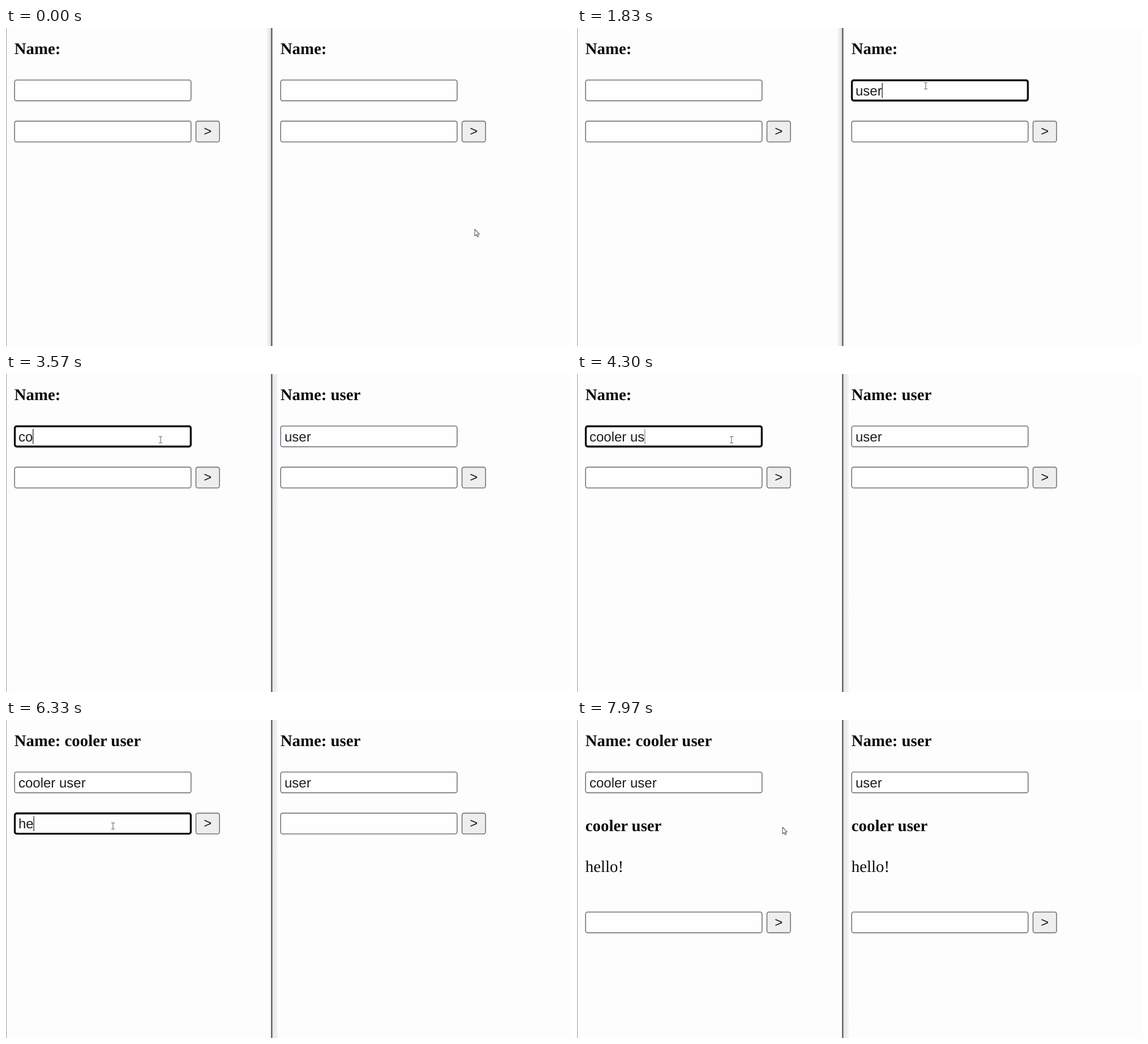
Recreate the animation shown at these times as an HTML page. Size 998x561 px, loop 8 s.

```html
<!DOCTYPE html>
<html lang="en">
<head>
<meta charset="utf-8">
<title>Two chat windows</title>
<style>
  html, body { margin: 0; width: 100%; height: 100%; overflow: hidden; background: #fdfdfd; }
  svg { display: block; width: 100%; height: 100%; }
  text { fill: #0c0c0c; white-space: pre; text-rendering: geometricPrecision; }
  .head { font: bold 28.8px "Liberation Serif", "Times New Roman", serif; }
  .body { font: 28.8px "Liberation Serif", "Times New Roman", serif; }
  .field { font: 24px "Liberation Sans", Arial, sans-serif; fill: #1c1c1c; }
</style>
</head>
<body>
<svg id="stage" viewBox="0 0 998 561">
  <defs>
    <linearGradient id="shadeL">
      <stop offset="0" stop-color="#fdfdfd"/>
      <stop offset="1" stop-color="#dedee2"/>
    </linearGradient>
    <linearGradient id="shadeR">
      <stop offset="0" stop-color="#e6e6e8"/>
      <stop offset="1" stop-color="#f4f4f5"/>
    </linearGradient>
  </defs>
  <rect width="998" height="561" fill="#fdfdfd"/>
  <rect width="1" height="561" fill="#999"/>
  <rect id="leftShade" x="459" width="9" height="561" fill="url(#shadeL)"/>
  <rect id="rightShade" x="470.5" width="9.5" height="561" fill="url(#shadeR)"/>
  <rect x="468" width="2.6" height="561" fill="#66666c"/>
</svg>
<script>
const LOOP = 8000;
const stage = document.getElementById('stage');
const leftShade = document.getElementById('leftShade');
const rightShade = document.getElementById('rightShade');

function make(tag, attrs, parent = stage, content = '') {
  const el = document.createElementNS('http://www.w3.org/2000/svg', tag);
  set(el, attrs);
  el.textContent = content;
  parent.appendChild(el);
  return el;
}

function set(el, attrs) {
  for (const key in attrs) el.setAttribute(key, attrs[key]);
}

const show = (el, on) => el.setAttribute('visibility', on ? 'visible' : 'hidden');

function makeField(parent) {
  const g = make('g', {}, parent);
  return {
    box: make('rect', { fill: '#fefefe' }, g),
    text: make('text', { class: 'field', x: 7.2, y: 27.5 }, g),
    caret: make('rect', { y: 6, width: 1.3, height: 26.5, fill: '#222' }, g),
    g
  };
}

function makePane(x) {
  const g = make('g', { transform: `translate(${x} 0)` });
  const pane = { x, title: make('text', { class: 'head', x: 0, y: 45.5 }, g) };
  pane.name = makeField(g);
  pane.post = make('g', {}, g);
  make('text', { class: 'head', y: 196 }, pane.post, 'cooler user');
  make('text', { class: 'body', y: 268 }, pane.post, 'hello!');
  pane.row = make('g', {}, g);
  pane.msg = makeField(pane.row);
  pane.button = make('rect', {
    x: 320.7, y: 0.8, width: 41.6, height: 36.6, rx: 3.4,
    stroke: '#74747a', 'stroke-width': 1.6
  }, pane.row);
  make('text', { class: 'field', x: 341.5, y: 26.8, 'text-anchor': 'middle' }, pane.row, '>');
  pane.name.g.setAttribute('transform', 'translate(0 91)');
  return pane;
}

const left = makePane(14.8);
const right = makePane(484.8);

const arrow = make('path', {
  d: 'M0 0V11.8L2.8 9.4L4.8 13.4L6.6 12.5L4.8 8.7H8.2Z',
  fill: '#fff', stroke: '#5c5c66', 'stroke-width': 1.1, 'stroke-linejoin': 'round'
});
const beam = make('path', {
  d: 'M-3 -5.5H-.8L0 -5L.8 -5.5H3M0 -5V5M-3 5.5H-.8L0 5L.8 5.5H3',
  fill: 'none', stroke: '#62626a', 'stroke-width': 1.1
});

// Pointer moves: start, end, target x, target y
const home = [828, 355];
const moves = [
  [200, 950, 616, 102],
  [2380, 2800, 273, 116],
  [4850, 5180, 204, 147],
  [5420, 5650, 189, 187],
  [7030, 7430, 363, 189]
];

// Typing sessions: focus span and the time of each key
const typing = {
  user: { from: 1050, to: 2840, word: 'user', keys: [1380, 1510, 1630, 1760] },
  cooler: {
    from: 2900, to: 5220, word: 'cooler user',
    keys: [3420, 3530, 3640, 3750, 3850, 3950, 4060, 4180, 4290, 4410, 4520]
  },
  hello: { from: 5720, to: 7600, word: 'hello!', keys: [6170, 6290, 6420, 6540, 6660, 6860] }
};
const ACTIVATE = 2840, SENT = 7690;

function pointerAt(t) {
  let [x, y] = home;
  for (const [start, end, tx, ty] of moves) {
    const p = Math.min(1, Math.max(0, (t - start) / (end - start)));
    const k = p * p * (3 - 2 * p);
    x += (tx - x) * k;
    y += (ty - y) * k;
  }
  return [x, y];
}

function drawField(field, t, session, hover) {
  const focus = !!session && t >= session.from && t < session.to;
  const count = session ? session.keys.filter(k => k <= t).length : 0;
  const inset = focus ? 1.2 : 0.8;
  set(field.box, {
    x: inset - 0.4, y: inset, width: 313.2 - 2 * inset, height: 38.2 - 2 * inset, rx: 3.4,
    stroke: focus ? '#101014' : hover ? '#48484e' : '#74747c',
    'stroke-width': focus ? 3.4 : 1.6
  });
  field.text.textContent = session ? session.word.slice(0, count) : '';
  show(field.caret, false);
  if (!focus) return;
  const last = count ? session.keys[count - 1] : session.from;
  show(field.caret, (t - last) % 1060 < 530);
  const width = count ? field.text.getComputedTextLength() : 0;
  set(field.caret, { x: 7 + width, opacity: t - last < 40 ? 0.5 : 1 });
}

function drawPane(pane, t, nameSession, msgSession, px, py) {
  const rowY = t >= SENT ? 338 : 163.6;
  const inside = (x, y, w) =>
    px >= pane.x + x && px <= pane.x + x + w && py >= y && py <= y + 38;
  const overName = inside(0, 91, 313);
  const overMsg = inside(0, rowY, 313);
  const named = t >= nameSession.to;
  pane.title.textContent = 'Name:' + (named ? ' ' + nameSession.word : '');
  drawField(pane.name, t, nameSession, overName);
  drawField(pane.msg, t, t < SENT ? msgSession : null, overMsg);
  pane.row.setAttribute('transform', `translate(0 ${rowY})`);
  pane.button.setAttribute('fill', inside(320, rowY, 43) ? '#e3e3e3' : '#eeeeee');
  show(pane.post, t >= SENT);
  return overName || overMsg;
}

function draw(t) {
  const [px, py] = pointerAt(t);
  const overLeft = drawPane(left, t, typing.cooler, typing.hello, px, py);
  const overRight = drawPane(right, t, typing.user, null, px, py);
  const overText = overLeft || overRight;
  show(arrow, !overText);
  show(beam, overText);
  set(overText ? beam : arrow, { transform: `translate(${px} ${py})` });
  show(leftShade, t < ACTIVATE);
  show(rightShade, t >= ACTIVATE);
}

const began = performance.now();
function tick() {
  draw((performance.now() - began) % LOOP);
  requestAnimationFrame(tick);
}
tick();
</script>
</body>
</html>
```
